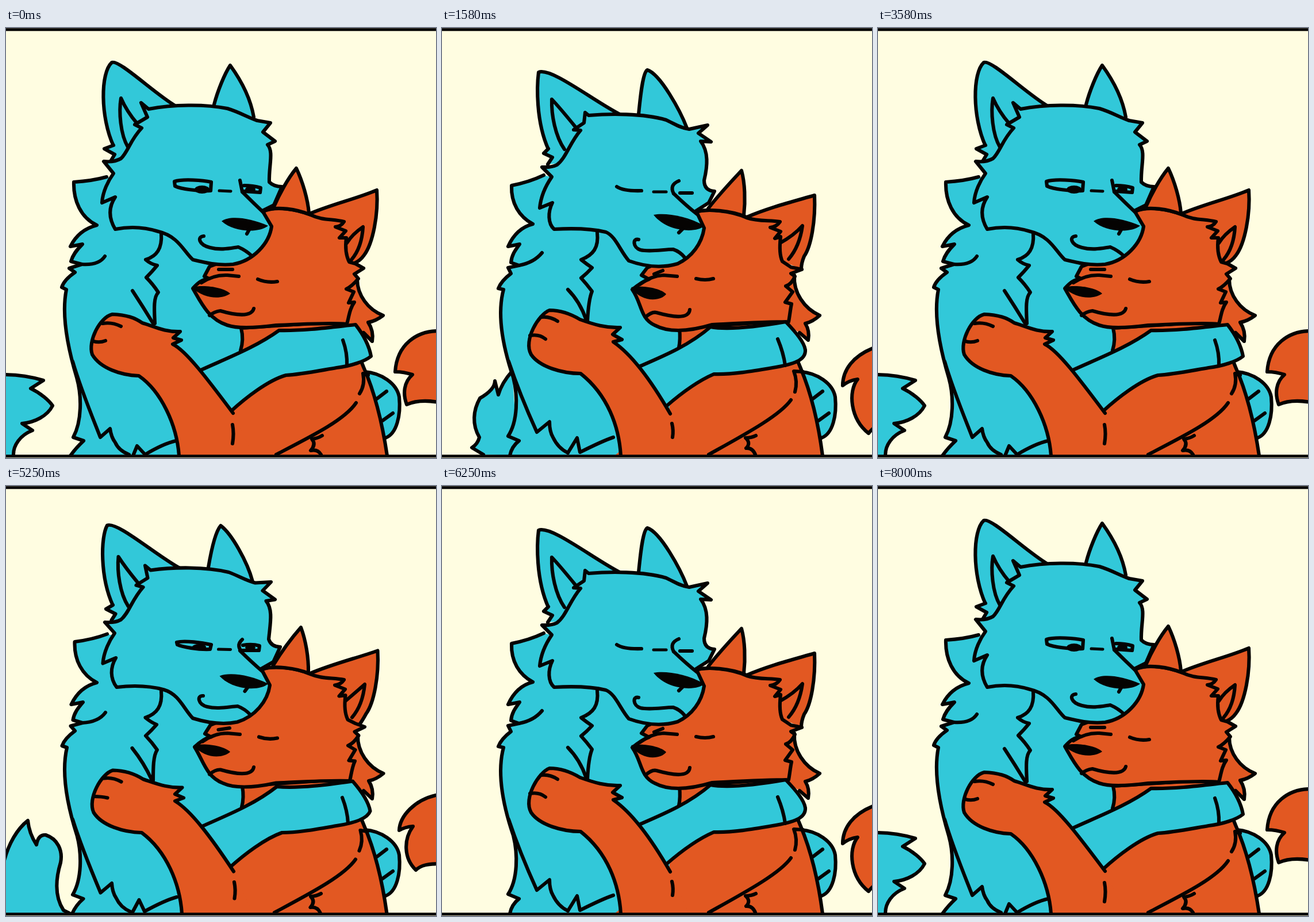
Recreate the animation shown at these times as an HTML page with a canvas. Size 748 by 748 pixels, loop 8410 ms.

```html
<!DOCTYPE html>
<html lang="en">
<head>
<meta charset="utf-8">
<title>Hug</title>
<style>
html, body { margin: 0; width: 100%; height: 100%; overflow: hidden; background: #fffde1; }
canvas { display: block; width: 748px; height: 748px; }
</style>
</head>
<body>
<canvas id="stage" width="748" height="748"></canvas>
<script>
const ctx = document.getElementById('stage').getContext('2d');
const BLUE = '#32c8d9', ORANGE = '#e25822', BLACK = '#050302', CREAM = '#fffde1';
const LOOP = 8410;

// Blends two path strings that share the same commands.
function mix(a, b, k) {
  if (!b || k === 0) return a;
  const ends = b.match(/-?[\d.]+/g);
  let i = 0;
  return a.replace(/-?[\d.]+/g, n => +n + (ends[i++] - n) * k);
}

function line(d, width = 6.1) {
  ctx.lineWidth = width;
  ctx.stroke(new Path2D(d));
}

// "closing" extends the filled area beyond the inked outline.
function shape(color, d, closing = '') {
  ctx.fillStyle = color;
  ctx.fill(new Path2D(d + closing));
  line(d);
}

const blueTails = {
  low: ['M-4 603C25 603 45 607 65 613L43 627C60 635 75 648 81 657C72 675 50 686 28 688L46 700C25 708 12 726 13 744', 'L-4 744Z'],
  up: ['M-4 655C4 622 20 596 38 582Q40 604 53 624Q56 606 69 607C90 614 99 634 95 655C86 685 85 715 100 738L110 743', 'L-4 744Z'],
  mid: ['M34 744C20 690 40 612 78 561L84 606L101 586C126 620 108 690 120 744', 'Z'],
  near: ['M122 597Q104 617 98 638L92 614Q92 629 66 644C54 665 52 690 65 712Q62 724 52 730L72 742', 'L132 744Z']
};

const orangeTails = [
  'M752 527C715 527 680 550 677 598Q692 598 707 603C692 616 690 636 697 655C715 647 735 648 752 651',
  'M752 537C710 545 685 575 684 599Q694 593 708 592C691 615 692 648 713 668C725 657 740 658 752 657',
  'M752 544C715 555 695 580 693 601Q704 594 718 597C699 620 706 652 720 675C730 670 740 668 752 664',
  'M752 556C715 570 697 595 697 622Q708 613 723 611C706 632 710 680 742 705C746 700 748 698 752 695'
];

function drawTails(blue, orange) {
  if (blueTails[blue]) shape(BLUE, ...blueTails[blue]);
  const i = Math.min(2, Math.floor(orange));
  shape(ORANGE, mix(orangeTails[i], orangeTails[i + 1], orange - i));
}

function drawBlueBody(m) {
  shape(BLUE, m(
    'M175 259Q150 266 118 268C117 300 130 330 158 343C138 348 122 360 112 380L133 376C122 387 116 395 113 406L132 411L110 418L120 425Q101 438 97 451L105 455C96 500 107 555 123 608C132 640 132 684 117 712L135 718Q122 730 112 744',
    'M177 256Q152 268 121 274C120 305 134 328 158 341C138 346 124 360 115 380L135 376C127 387 121 395 120 408L134 413L115 417L120 427Q103 440 98 453L107 455C95 500 106 555 124 608C132 640 132 684 115 710L134 718Q121 728 118 744'),
    'L430 744L430 320Z');
  line(m('M132 411Q162 413 172 397', 'M134 413Q160 408 174 391'));
  line(m('M116 580C130 628 150 676 164 712L181 697Q183 712 190 721Q196 735 214 742',
         'M116 580C130 622 150 670 165 703L187 685Q187 702 193 712Q202 731 219 739'));
  line(m('M221 744L228 727L242 742C262 730 278 722 296 718',
         'M219 739L235 713L240 738C262 727 280 718 298 712'));
  line(m('M270 357C272 384 262 397 243 403Q252 411 263 413Q254 424 244 434Q256 446 265 460C256 468 258 492 259 514',
         'M270 356C273 382 263 395 242 403Q252 411 261 417Q252 427 242 435Q252 446 261 458C256 470 254 490 253 510'));
  line(m('M220 457Q239 486 256 514', 'M219 455Q240 476 251 508'));
}

function drawBlueHand() {
  shape(BLUE, 'M624 598C652 600 680 618 684 642C687 673 680 706 660 713');
  line('M662 632L645 645');
  line('M673 670L655 683');
}

function drawOrangeBody(m) {
  shape(ORANGE, m(
    'M611 437C611 465 630 490 656 500Q643 510 630 512Q640 527 637 545L622 530',
    'M613 430C611 460 630 488 657 500Q645 511 632 514Q640 527 637 543L622 530'), 'L590 510L600 440Z');
  shape(ORANGE, m('M408 561Q414 542 409 522L590 510L622 590C642 635 655 690 663 744',
                  'M412 556Q415 542 413 522L590 510L624 592C642 635 655 690 662 744'),
    'L300 744L395 665Z');
  line(m('M470 742C530 711 589 682 609 652', 'M464 742C525 708 587 675 607 647'));
  line(m('M615 636Q625 621 621 601L630 604', 'M614 633Q619 615 612 597L628 598'));
  line(m('M550 709Q542 714 532 715Q540 724 530 735Q542 732 548 742',
         'M546 709Q538 713 528 713Q538 722 529 731Q540 730 545 742'));
}

function drawOrangeHead(m) {
  shape(ORANGE, m('M526 324C565 307 610 297 645 282C648 325 638 375 623 395Q616 405 606 409',
                  'M530 329C570 312 610 302 648 291C650 335 642 380 630 397Q625 409 625 419'), 'L590 405L570 340Z');
  line(m('M593 374Q602 359 621 346Q619 382 601 403', 'M588 374Q612 361 627 344Q622 380 603 402'));
  shape(ORANGE, m(
    'M450 318C470 310 505 315 530 325C550 335 570 332 588 337Q583 345 573 346L591 353L580 365L592 365C590 380 591 395 597 407L608 410L622 418L606 428L613 436Q601 450 592 454L605 459L596 478L606 477C598 488 597 500 593 515C560 512 510 516 470 517C440 521 405 524 385 517C352 506 340 479 325 453C333 444 341 437 353 436L345 432L354 415L400 398Z',
    'M440 320C460 314 502 317 530 330C550 337 570 334 588 337Q582 346 571 347L589 354L579 366L589 363C587 380 587 395 592 406L607 416L626 420L607 427L614 432Q608 446 598 449L610 459L597 477L608 480C606 489 605 500 603 511C560 511 510 514 470 516C440 525 400 533 370 517C344 505 348 479 331 455C341 447 351 440 360 437L347 430L357 417L400 398Z'));
  line(m('M340 443Q361 429 385 430L405 432', 'M344 446Q364 431 385 430L409 432'));
  line(m('M370 420L394 420', 'M369 428L384 422'));
  ctx.fillStyle = BLACK;
  ctx.fill(new Path2D(m('M323 451C345 446 378 451 390 462C376 472 346 473 323 451Z',
                        'M329 451C350 447 381 453 390 463C380 476 346 478 329 451Z')));
  line(m('M354 500Q363 493 373 492C400 500 427 503 431 488', 'M354 503Q365 493 373 495C398 502 429 508 431 490'));
  line(m('M438 437Q454 444 472 441', 'M442 436Q458 440 472 436'));
}

function drawBlueArm(m) {
  shape(BLUE, m(
    'M339 595C385 574 435 555 475 526C520 527 570 520 608 516C619 530 631 549 635 571C624 580 600 588 575 591C540 597 510 603 487 604C455 613 415 645 392 666',
    'M343 589C387 570 430 552 467 520C500 526 552 519 598 511C615 529 630 546 632 560C633 578 612 585 575 591C540 597 505 603 473 602C445 614 413 638 390 658'));
  line(m('M586 543Q594 565 593 587', 'M584 541Q594 565 597 587'));
}

function drawOrangeArm(m) {
  shape(ORANGE, m(
    'M301 744C297 690 270 632 231 605C200 604 164 592 150 568C142 545 163 503 185 498C210 499 224 504 237 513C258 519 275 529 303 528L291 539L305 543L290 550C313 561 350 610 395 670',
    'M311 744C308 693 288 638 241 601C210 601 170 590 155 568C141 543 168 498 187 491C207 491 225 498 240 507C265 516 285 522 310 521L297 533L313 542L298 546C330 568 362 610 397 671'),
    'L430 744Z');
  line(m('M168 514Q184 511 200 519', 'M172 503Q187 501 201 510'));
  line(m('M152 545Q163 548 173 544', 'M153 535Q169 532 180 541'));
  line(m('M394 690Q397 705 394 723', 'M400 688Q403 700 401 712'));
}

const eyes = {
  0: {
    lids: ['M293 267C308 262 343 265 357 268L356 283C334 284 304 280 294 275Z', 'M407 265L411 285M414 274Q430 274 443 278L442 286L414 284'],
    pupils: [[341, 281, 13, 7], [425, 281, 9, 6]]
  },
  0.5: {
    lids: ['M297 272C310 268 343 273 357 276L355 284C334 285 307 280 298 276Z', 'M411 267Q402 275 407 284M412 277Q428 274 441 278L440 286L410 286'],
    pupils: [[336, 280, 12, 5], [425, 281, 9, 4]]
  },
  1: {
    lids: ['M304 276Q316 284 347 283', 'M412 266Q395 273 403 288M414 287L435 287'],
    pupils: []
  }
};

function drawBlueHead(m, pose) {
  shape(BLUE, m('M187 205C164 155 164 78 184 60C196 54 257 113 294 135', 'M185 211C163 162 165 100 168 77C190 68 265 128 311 151'),
    'L250 190L200 235Z');
  shape(BLUE, m('M187 204L171 210L189 220L183 230', 'M185 210L177 218L192 225L184 237'), 'L215 235L230 190Z');
  line(m('M212 207C199 185 196 146 200 122Q210 145 228 166', 'M213 211C197 188 190 151 191 124Q206 140 232 172'));
  shape(BLUE, m('M362 133C368 110 380 80 390 65C406 87 425 120 431 155', 'M342 150C345 120 349 78 357 73C380 80 415 145 426 174'));
  shape(BLUE, m(
    'M248 141C290 133 345 132 385 140C405 146 420 155 437 161L460 165L447 181L468 197L455 203C466 215 457 240 458 268Q466 276 480 276L466 308L446 318L462 345C458 375 430 405 395 411C370 414 345 408 325 403C310 390 300 362 265 354C240 346 215 345 190 350C178 330 178 312 190 294L167 304C168 285 178 265 187 253L170 232Q188 234 200 227C212 216 216 195 236 174L224 168L246 155L235 130Z',
    'M255 152C290 149 350 148 390 160C405 167 415 174 430 176L462 169L446 183L468 198L450 197C464 215 462 240 456 265Q456 283 474 284L464 304L442 318L456 348C452 375 435 398 410 410C380 419 350 414 325 405C310 388 302 362 285 355C260 349 230 348 195 350C184 340 184 320 192 304L170 313C172 292 182 272 191 259L174 242Q190 243 200 238C216 226 222 200 241 178L229 177L247 165L249 147Z'));
  line(m('M411 285Q430 304 448 321', 'M403 288Q427 311 444 324'));
  line(m('M371 283L391 284', 'M368 285L390 285'), 5);
  const face = eyes[pose];
  face.lids.forEach(d => line(d));
  ctx.fillStyle = BLACK;
  for (const [x, y, rx, ry] of face.pupils) {
    ctx.beginPath();
    ctx.ellipse(x, y, rx, ry, 0, 0, 7);
    ctx.fill();
  }
  ctx.fill(new Path2D(m('M375 336C388 326 422 329 456 344C440 357 397 356 375 336Z',
                        'M368 325C388 321 427 327 456 344C445 357 392 356 368 325Z')));
  line(m('M424 349L419 358', 'M418 350L412 356'));
  line(m('M344 362C332 363 335 377 355 382C374 387 390 383 404 381Q418 387 428 397',
         'M342 368C331 365 332 382 345 386C362 390 385 385 402 385Q414 389 422 399'));
}

function drawOrangeEar(m) {
  shape(ORANGE, m('M466 311C475 290 490 262 505 244C516 267 525 298 527 322', 'M463 314C480 292 505 265 521 248C527 270 528 300 525 326'));
  line(m('M450 317C472 310 505 315 530 325', 'M441 320C462 314 502 317 530 329'));
}

// Pose (0 awake, 1 asleep), blue tail, orange tail position.
const cycle = [
  [0.5, 'up', 1], [1, 'mid', 2], [1, 'near', 2.5], [1, 'hidden', 2.8], [1, 'hidden', 3],
  [1, 'near', 3], [1, 'mid', 3], [1, 'up', 3], [1, 'near', 3], [1, 'hidden', 3],
  [1, 'hidden', 2], [0.5, 'up', 1], [0, 'low', 0]
];
const times = [
  920, 1000, 1080, 1170, 1250, 1580, 1670, 1750, 1830, 1920, 3420, 3500, 3580,
  5250, 5330, 5420, 5500, 5580, 5920, 6000, 6080, 6170, 6250, 7830, 7920, 8000
];

function draw(state) {
  const [pose, blueTail, orangeTail] = cycle[state];
  const m = (a, b) => mix(a, b, pose);
  ctx.fillStyle = CREAM;
  ctx.fillRect(0, 0, 748, 748);
  ctx.strokeStyle = BLACK;
  ctx.lineCap = ctx.lineJoin = 'round';
  drawTails(blueTail, orangeTail);
  drawBlueBody(m);
  drawBlueHand();
  drawOrangeBody(m);
  drawOrangeHead(m);
  drawBlueArm(m);
  drawOrangeArm(m);
  drawBlueHead(m, pose);
  drawOrangeEar(m);
  ctx.fillStyle = CREAM;
  ctx.fillRect(0, 745, 748, 3);
  line('M-4 2.7H752M-4 744.8H752', 5);
}

let start, shown = -1;
function tick(now) {
  start ??= now;
  const t = (now - start) % LOOP;
  const passed = times.filter(at => at <= t).length;
  const state = (passed + cycle.length - 1) % cycle.length;
  if (state !== shown) draw(shown = state);
  requestAnimationFrame(tick);
}
draw(shown = cycle.length - 1);
requestAnimationFrame(tick);
</script>
</body>
</html>
```
